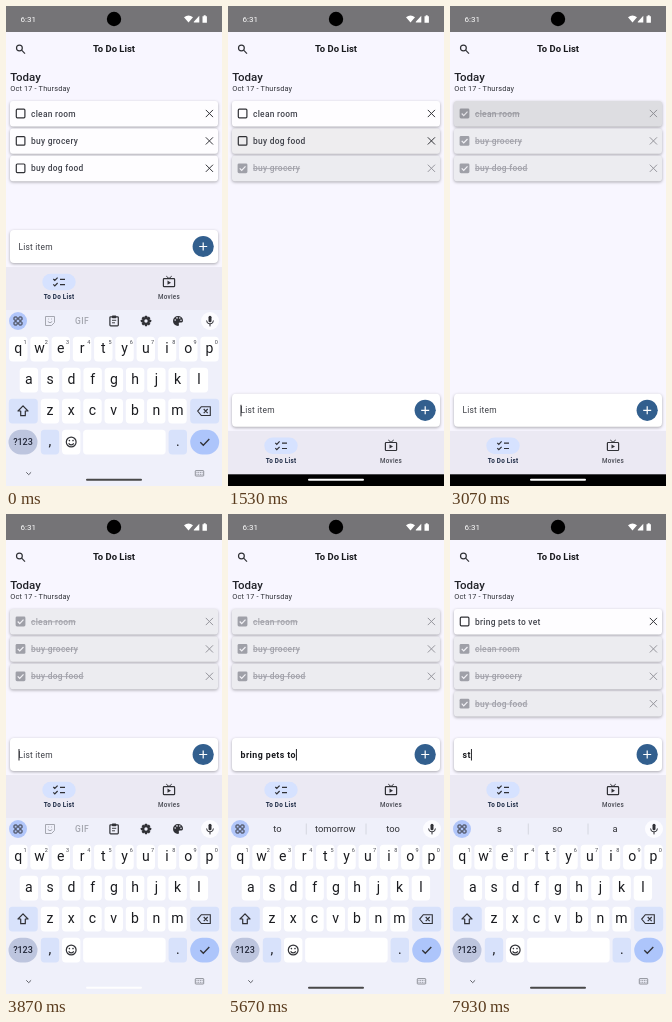
Write an HTML page that moves like this. It is 216 px wide and 480 px high and loops after 8000 ms.

```html
<!DOCTYPE html>
<html lang="en">
<head>
<meta charset="utf-8">
<title>To Do List</title>
<style>
html, body { margin: 0; width: 100%; height: 100%; overflow: hidden; background: #f8f6ff; }
svg { display: block; width: 216px; height: 480px; font-family: Roboto, sans-serif; }
text { white-space: pre; }
.mid { text-anchor: middle; }
.card { filter: drop-shadow(0 1px 1.6px rgba(0, 0, 0, .32)); }
.line { fill: none; stroke: #303136; stroke-width: 1.2; }
.item { font-size: 8.41px; font-weight: 500; letter-spacing: .28px; }
.tab { font-size: 6.3px; letter-spacing: .26px; }
.key { font-size: 14px; fill: #1b1c20; }
.word { font-size: 9.4px; fill: #303136; }
#typed { font-size: 8.8px; font-weight: 600; letter-spacing: .42px; fill: #18191d; }
</style>
</head>
<body>
<svg id="stage" viewBox="0 0 216 480"></svg>
<script>
const LOOP = 8000;
const ROW_TOP = 95, ROW_STEP = 27.4, ROW_H = 25.4;
const stage = document.getElementById('stage');
const $ = id => document.getElementById(id);

const rect = (x, y, w, h, r, fill, more = '') =>
  `<rect x="${x}" y="${y}" width="${w}" height="${h}" rx="${r}" fill="${fill}" ${more}/>`;
const circle = (x, y, r, fill, more = '') => `<circle cx="${x}" cy="${y}" r="${r}" fill="${fill}" ${more}/>`;
const path = (d, more = '') => `<path class="line" d="${d}" ${more}/>`;
const text = (x, y, s, more = '') => `<text x="${x}" y="${y}" ${more}>${s}</text>`;

// Tables: [start time, value]
const lists = [
  [0, ['clean room', 'buy grocery', 'buy dog food']],
  [1070, ['clean room', 'buy dog food', '*buy grocery']],
  [1930, ['clean room', '*buy grocery', '*buy dog food']],
  [2530, ['*clean room', '*buy grocery', '*buy dog food']],
  [7070, ['bring pets to vet', '*clean room', '*buy grocery', '*buy dog food']]
];
const typing = [
  [0, ''], [4070, 'b'], [4270, 'br'], [4400, 'bri'], [4470, 'brin'], [4600, 'bring'],
  [4870, 'bring '], [4930, 'bring p'], [5000, 'bring pe'], [5130, 'bring pet'],
  [5270, 'bring pets'], [5400, 'bring pets '], [5530, 'bring pets t'], [5670, 'bring pets to'],
  [5730, 'bring pets to '], [5870, 'bring pets to v'], [6000, 'bring pets to ve'],
  [6070, 'bring pets to vet'], [7070, ''], [7530, 's'], [7870, 'st']
];
const hints = [
  [0, ''], [4270, 'b be but'], [4470, 'bring brought bright'], [4870, 'it the me'],
  [5000, 'p pizza power'], [5130, 'pe people pet'], [5330, 'pets pet petty'],
  [5470, 'to and for'], [5600, 'to tomorrow too'], [5800, 'the my a'], [5930, 'v very via'],
  [6270, 'vet very vets'], [7130, ''], [7670, 's so a']
];
const caretFlips = [
  [0, 0], [1330, 1], [1870, 0], [2400, 1], [2930, 0], [3470, 1], [6530, 0], [6870, 1]
];
// Touch ripples: [row, start, fade start, end]
const ripples = [[1, 930, 1530, 1730], [1, 1870, 2000, 2070], [0, 2400, 3070, 3330]];

const at = (table, t) => table.reduce((v, [start, value]) => t >= start ? value : v, table[0][1]);
const part = (t, a, b) => Math.min(1, Math.max(0, (t - a) / (b - a)));
const inOut = p => p * p * (3 - 2 * p);
const out = p => 1 - (1 - p) ** 3;

function statusBar() {
  return rect(0, 0, 216, 26, 0, '#757477') + circle(108, 13, 7.2, '#000') +
    text(14.5, 16.3, '6:31', 'font-size="8" fill="#fff"') +
    '<path fill="#fff" d="M178 11.3Q182.500 7.500 187 11.300L182.500 16.500ZM187.800 16.500V15.700L193.300 9.800V16.500ZM196.500 10.300H197.700V9.300H199.700V10.300H200.900V16.700H196.500Z"/>';
}

function header() {
  return circle(13.4, 42, 2.9, 'none', 'class="line"') + path('M15.600 44.200L19 47.600', 'stroke-width="1.4"') +
    text(108, 46.4, 'To Do List', 'class="mid" font-size="9.46" font-weight="700" fill="#18191d"') +
    text(4.2, 75.2, 'Today', 'font-size="11.5" font-weight="500" fill="#222329"') +
    text(4.2, 85, 'Oct 17 - Thursday', 'font-size="7.36" letter-spacing=".16" fill="#303238"');
}

function row(label, i) {
  const done = label[0] === '*', name = label.replace('*', '');
  const y = ROW_TOP + i * ROW_STEP, c = y + 12.5;
  const ink = done ? '#a3a3ab' : '#44464f';
  const box = done
    ? rect(9.6, c - 4.9, 9.8, 9.8, 1.4, '#9fa0a8') + path(`M11.700 ${c}l2 2.100l3.800 -4`, 'style="stroke:#f2f1f6"')
    : rect(10.3, c - 4.3, 8.6, 8.6, 1, 'none', 'class="line"');
  return rect(4, y, 208, ROW_H, 3, done ? '#ececf0' : '#fefdff', 'class="card"') + box +
    text(25, c + 3, name, `class="item" fill="${ink}" ${done ? 'text-decoration="line-through"' : ''}`) +
    path(`M199.800 ${c - 3.6}l7.200 7.200m0 -7.200l-7.200 7.200`, `style="stroke:${done ? '#96969d' : '#34353a'};stroke-width:1"`);
}

function dock() {
  return rect(4, 224, 208, 33, 4, '#fff', 'class="card"') +
    text(12.6, 243.5, 'List item', 'id="empty" font-size="8.41" letter-spacing=".2" fill="#3f4148"') +
    text(12.6, 243.5, '', 'id="typed"') +
    rect(12.5, 235, 1, 11.5, 0, '#26272c', 'id="caret"') +
    circle(197.2, 240.5, 10.6, '#325f8e') + circle(197.2, 240.5, 10.6, '#fff', 'id="tap" opacity="0"') +
    path('M193.200 240.500h8m-4 -4v8', 'style="stroke:#fff"') +
    rect(0, 261, 216, 43.5, 0, '#ebe9f3') +
    rect(36.3, 267.8, 33.4, 16.4, 8.2, '#d6e2ff') +
    path('M54 273.300h5M54 278.700h5M47.300 273l1.500 1.500l2.800 -2.900M47.300 278.400l1.500 1.500l2.800 -2.900') +
    text(53, 293, 'To Do List', 'class="tab mid" font-weight="700" fill="#1d2b45"') +
    rect(157.4, 272.7, 11.2, 8, .8, 'none', 'class="line"') +
    path('M160.300 270.200l2.700 2.300l2.700 -2.300', 'style="stroke-width:1"') +
    '<path d="M161.500 274.600v4.200l3.500 -2.100z" fill="#303136"/>' +
    text(163, 293, 'Movies', 'class="tab mid" font-weight="500" fill="#44464f"');
}

function tools() {
  const dim = 'style="stroke:#a5a7b0;stroke-width:1"';
  const teeth = [...Array(8)].map((_, i) => rect(138.8, 309.8, 2.4, 3, .4, '#303136', `transform="rotate(${i * 45} 140 315)"`)).join('');
  const paints = [[169.2, 314], [171, 311.9], [173.8, 312], [175, 314.2]].map(([x, y]) => circle(x, y, .8, '#eff0fa')).join('');
  return path('M39.500 310.500h9v6l-3 3h-6z', dim) + path('M41.800 315.500q2.200 2.600 4.400 0M42.300 313h.8M45 313h.8', dim) +
    text(76, 318.2, 'GIF', 'class="mid" font-size="8.5" font-weight="500" letter-spacing=".3" fill="#a5a7b0"') +
    rect(103.9, 310.8, 8.4, 9, .8, 'none', 'class="line"') + rect(106, 309.4, 4.2, 2.8, .6, '#303136') +
    path('M106 314.300h4.200M106 316.800h3', 'style="stroke-width:.9"') +
    teeth + circle(140, 315, 3.9, '#303136') + circle(140, 315, 1.7, '#eff0fa') +
    '<path fill="#303136" d="M172 310a5 5 0 1 0 0 10q1.700 -.4 .8 -2q-.5 -1.400 1.200 -1.400h1.500q1.500 0 1.500 -2a5 4.600 0 0 0 -5 -4.600z"/>' + paints;
}

function keyboard() {
  const key = (c, r, w, fill = '#fff', round = 3.6) => rect(c - w / 2, 330.8 + 31 * r, w, 24.6, round, fill);
  let s = rect(0, 304, 216, 180, 0, '#eff0fa') +
    circle(12, 315, 9, '#b1c6fa') + circle(204, 315, 9, '#fcfcff');
  for (const dx of [-2.4, 2.4]) for (const dy of [-2.4, 2.4])
    s += rect(10.4 + dx, 313.4 + dy, 3.2, 3.2, .7, 'none', 'class="line" style="stroke-width:1"');
  s += rect(202.5, 309.8, 3, 6.4, 1.5, '#303136') + path('M200.600 314.500a3.400 3.400 0 0 0 6.800 0M204 318v2.400', 'style="stroke-width:1"');
  s += `<g id="tools">${tools()}</g><g id="hints"></g>`;
  ['qwertyuiop', 'asdfghjkl', 'zxcvbnm'].forEach((letters, r) => {
    [...letters].forEach((ch, i) => {
      const x = [12.3, 22.9, 44][r] + i * 21.25;
      s += key(x, r, 18.4) + text(x, 347 + 31 * r, ch, 'class="key mid"');
      if (!r) s += text(x + 6.8, 337.8, (i + 1) % 10, 'class="mid" font-size="5.5" fill="#44464f"');
    });
  });
  s += key(17.3, 2, 29, '#d8e2fb') + key(198.7, 2, 29, '#d8e2fb') +
    path('M17 399.800l5 5.200h-2.700v4.700h-4.600v-4.700h-2.700z', 'stroke-linejoin="round"') +
    path('M195.300 400.700h9v8.800h-9l-3.600 -4.400zM197.700 403l4 4.200m0 -4.200l-4 4.200', 'style="stroke-width:1.1"');
  s += key(17, 3, 29, '#bdc5de', 12.3) + text(17, 439.2, '?123', 'class="mid" font-size="9" font-weight="500" fill="#23283a"') +
    key(44, 3, 18.4, '#d8e2fb') + text(44, 440, ',', 'class="key mid"') +
    key(65.2, 3, 18.4) + circle(65.2, 436, 4.9, 'none', 'class="line"') +
    path('M62.600 437.300q2.600 3.300 5.200 0') + circle(63.4, 434.6, .8, '#303136') + circle(67, 434.6, .8, '#303136') +
    key(118.4, 3, 82.5) + key(171.8, 3, 18.4, '#d8e2fb') + text(171.8, 440, '.', 'class="key mid"') +
    key(198.7, 3, 29, '#adc5fb', 12.3) + path('M194.300 436.300l3 3l6 -6.300', 'style="stroke-width:1.3"') +
    path('M20.300 466.300l2.400 2.400l2.400 -2.400', 'style="stroke:#5d5f66;stroke-width:1"') +
    rect(189.3, 464.6, 8.4, 5.4, .6, 'none', 'stroke="#777982" stroke-width=".8"') +
    path('M190.500 466.400h6M190.500 468.300h6', 'style="stroke:#777982;stroke-width:.8;stroke-dasharray:1 .7"');
  return s;
}

const clips = [0, 1].map(i =>
  `<clipPath id="clip${i}">${rect(4, ROW_TOP + i * ROW_STEP, 208, ROW_H, 3, '#000')}</clipPath>`).join('');

stage.innerHTML = `<defs>${clips}</defs>` + rect(0, 0, 216, 480, 0, '#f8f6ff') + statusBar() + header() +
  '<g id="rows"></g>' +
  ripples.map(([i], n) => `<g clip-path="url(#clip${i})">${circle(15, ROW_TOP + 12.5 + i * ROW_STEP, 0, '#1b1b1f', `id="ripple${n}"`)}</g>`).join('') +
  rect(0, 467, 216, 13, 0, '#000') +
  `<g id="dock">${dock()}</g><g id="keys">${keyboard()}</g>` +
  rect(80, 472.8, 56, 2, 1, '#fff', 'id="handle"');

const shown = {};
function change(name, value, apply) {
  if (shown[name] === value) return;
  shown[name] = value;
  apply(value);
}

function hintMarkup(words) {
  return words.split(' ').map((w, i) => text([49.5, 107.3, 165][i], 318.2, w, 'class="word mid"')).join('') +
    path('M78.300 309.500v11M138 309.500v11', 'style="stroke:#cfd1da;stroke-width:.8"');
}

function draw(t) {
  change('list', at(lists, t), v => { $('rows').innerHTML = v.map(row).join(''); });
  change('text', at(typing, t), v => {
    $('typed').textContent = v;
    $('empty').style.display = v ? 'none' : '';
    $('caret').setAttribute('x', v ? 12.6 + $('typed').getComputedTextLength() : 12.5);
  });
  change('hint', at(hints, t), v => {
    $('tools').style.display = v ? 'none' : '';
    $('hints').innerHTML = v ? hintMarkup(v) : '';
  });
  $('caret').setAttribute('opacity', at(caretFlips, t));

  ripples.forEach(([, start, fade, end], n) => {
    $('ripple' + n).setAttribute('r', 205 * out(part(t, start, start + 320)));
    $('ripple' + n).setAttribute('opacity', t < start ? 0 : .07 * (1 - part(t, fade, end)));
  });
  $('tap').setAttribute('opacity', t < 6870 ? 0 : .25 * (1 - part(t, 7000, 7330)));

  // The dock rides on the keyboard until it meets the system bar.
  const drop = 178 * (t < 2000 ? inOut(part(t, 30, 430)) : 1 - out(part(t, 3690, 3865)));
  $('keys').setAttribute('transform', `translate(0 ${drop})`);
  $('dock').setAttribute('transform', `translate(0 ${Math.min(drop, 163.8)})`);
  const light = t < 2000 ? part(t, 300, 480) : 1 - part(t, 3870, 4070);
  const tone = Math.round(72 + 183 * light);
  $('handle').setAttribute('fill', `rgb(${tone},${tone},${tone})`);
}

const begin = performance.now();
function tick() {
  draw((performance.now() - begin) % LOOP);
  requestAnimationFrame(tick);
}
tick();
</script>
</body>
</html>
```
